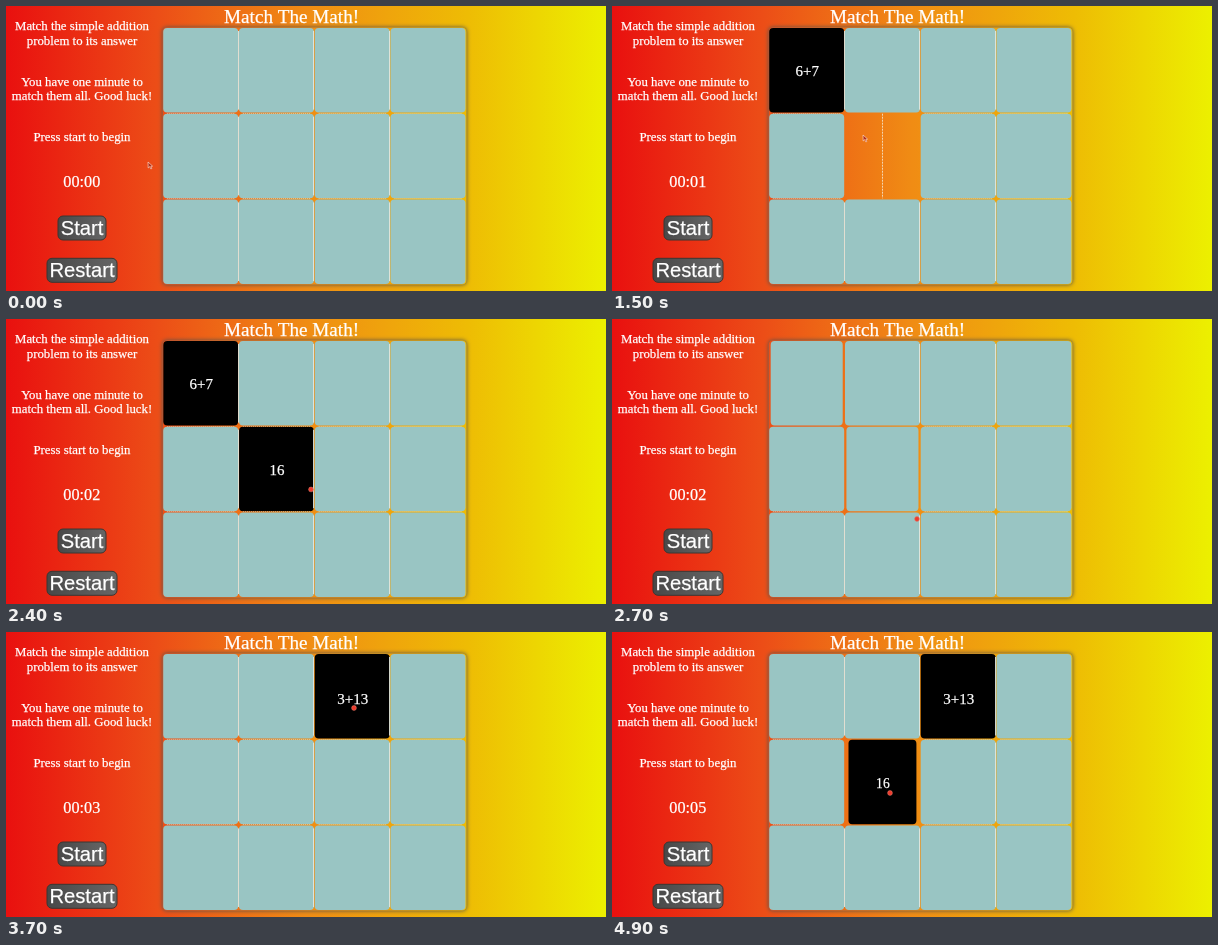
Recreate the animation shown at these times as an HTML page with a canvas. Size 600 by 285 pixels, loop 5000 ms.

```html
<!DOCTYPE html>
<html lang="en">
<head>
<meta charset="utf-8">
<title>Match The Math!</title>
<style>
html, body { margin: 0; width: 100%; height: 100%; overflow: hidden; }
canvas { display: block; width: 600px; height: 285px; }
</style>
</head>
<body>
<canvas id="stage" width="600" height="285"></canvas>
<script>
const ctx = document.getElementById('stage').getContext('2d');
const LOOP = 5000, STEP = 100, FLIP = 500;
const SERIF = '"Liberation Serif", Times, serif';
const SANS = '"Liberation Sans", Arial, sans-serif';
const CARD = { x: 157.2, y: 22, w: 75, h: 84.6, dx: 75.75, dy: 85.7 };
const BOARD = [156.5, 21.3, 304.2, 257.5, 4.5];

// Flip times alternate between opening and closing a card.
const faces = {
  0: { label: '6+7', base: 70, flips: [460, 2380] },
  2: { label: '3+13', base: 72, flips: [3150] },
  5: { label: '16', base: 156, flips: [1353, 2380, 4617] }
};

const path = [
  [0, 144, 159], [400, 197, 87], [800, 197, 87], [1300, 253, 132],
  [1500, 253, 132], [2000, 305, 165], [2300, 305, 165], [2700, 305, 200],
  [3100, 348, 76], [3900, 348, 76], [4550, 278, 161], [5000, 278, 161]
];

// The CSS "ease" curve
function ease(p) {
  if (p <= 0) return 0;
  if (p >= 1) return 1;
  let lo = 0, hi = 1;
  for (let i = 0; i < 24; i++) {
    const u = (lo + hi) / 2;
    if (0.75 * u * (1 - u) + u ** 3 < p) lo = u; else hi = u;
  }
  const v = 1 - lo;
  return 0.3 * lo * v * v + 3 * lo * lo * v + lo ** 3;
}

// Horizontal scale of a card: positive shows the back, negative the face
function spin(i, t) {
  const face = faces[i];
  if (!face) return 1;
  const turn = face.flips.reduce((a, start, k) => a + (k % 2 ? -1 : 1) * ease((t - start) / FLIP), 0);
  return Math.cos(Math.PI * turn);
}

const settled = (i, t) => Math.abs(spin(i, t)) > 0.99;

function pointerAt(t) {
  const i = Math.max(1, path.findIndex(p => p[0] > t));
  const [t0, x0, y0] = path[i - 1], [t1, x1, y1] = path[i];
  const p = (t - t0) / (t1 - t0), s = p * p * (3 - 2 * p);
  return [x0 + (x1 - x0) * s, y0 + (y1 - y0) * s];
}

function text(str, x, y, size, family = SERIF) {
  ctx.font = `${size}px ${family}`;
  ctx.textAlign = 'center';
  ctx.fillStyle = ctx.strokeStyle = '#fff';
  ctx.lineWidth = 0.25;
  ctx.fillText(str, x, y);
  ctx.strokeText(str, x, y);
}

function box(x, y, w, h, r) {
  ctx.beginPath();
  ctx.roundRect(x, y, w, h, r);
}

function line(x0, y0, x1, y1, color, dash = []) {
  ctx.setLineDash(dash);
  ctx.strokeStyle = color;
  ctx.lineWidth = 1;
  ctx.beginPath();
  ctx.moveTo(x0, y0);
  ctx.lineTo(x1, y1);
  ctx.stroke();
  ctx.setLineDash([]);
}

function background() {
  const g = ctx.createLinearGradient(0, 0, 600, 0);
  g.addColorStop(0, '#e9100f');
  g.addColorStop(0.25, '#ec4d17');
  g.addColorStop(0.5, '#f08c14');
  g.addColorStop(0.77, '#eebc04');
  g.addColorStop(1, '#ecf000');
  ctx.fillStyle = g;
  ctx.fillRect(0, 0, 600, 285);
}

function button(label, x, y, w, base) {
  const g = ctx.createLinearGradient(x, y, x + w, y);
  g.addColorStop(0, '#484848');
  g.addColorStop(1, '#666');
  box(x + 0.5, y + 0.5, w - 1, 24, 5);
  ctx.fillStyle = g;
  ctx.fill();
  ctx.strokeStyle = '#3a3632';
  ctx.lineWidth = 1;
  ctx.stroke();
  text(label, x + w / 2, base, 20.2, SANS);
}

function sidebar(t) {
  text('Match the simple addition', 76, 24.4, 12.8);
  text('problem to its answer', 76, 39, 12.8);
  text('You have one minute to', 76, 79.5, 12.8);
  text('match them all. Good luck!', 76, 94, 12.8);
  text('Press start to begin', 76, 134.6, 12.8);
  text('00:0' + Math.floor((t + 200) / 1000), 75.8, 180.8, 16.2);
  button('Start', 51.5, 209.5, 49, 229);
  button('Restart', 40.5, 251.8, 71, 271.3);
}

// Shadow outside the board only, as the board itself is clear.
function boardShadow() {
  ctx.save();
  ctx.beginPath();
  ctx.rect(0, 0, 600, 285);
  ctx.roundRect(...BOARD);
  ctx.clip('evenodd');
  ctx.shadowColor = '#55504a';
  ctx.shadowBlur = 4;
  ctx.fillStyle = '#666';
  box(...BOARD);
  ctx.fill();
  ctx.restore();
}

function card(i, t) {
  const { w, h } = CARD;
  const x = CARD.x + (i % 4) * CARD.dx, y = CARD.y + Math.floor(i / 4) * CARD.dy;
  const cx = x + w / 2, c = spin(i, t), s = Math.abs(c);
  if (s < 0.025) {
    line(Math.floor(cx) + 0.5, y, Math.floor(cx) + 0.5, y + h, 'rgba(245,235,215,0.8)', [2, 1]);
    return;
  }
  ctx.save();
  ctx.translate(cx, 0);
  ctx.scale(s, 1);
  box(-w / 2, y, w, h, 4);
  ctx.fillStyle = c > 0 ? '#99c5c3' : '#000';
  ctx.fill();
  if (c < 0) text(faces[i].label, 0.5, faces[i].base, 15);
  ctx.restore();
}

// Pale seams where two resting cards meet
function seams(t) {
  const { w, h, dx, dy } = CARD;
  for (let i = 0; i < 12; i++) {
    if (!settled(i, t)) continue;
    const x = CARD.x + (i % 4) * dx, y = CARD.y + Math.floor(i / 4) * dy;
    const sx = Math.floor(x + w) + 0.5, sy = Math.floor(y + h + 0.5) + 0.5;
    if (i % 4 < 3 && settled(i + 1, t)) line(sx, y + 3, sx, y + h - 3, 'rgba(226,232,226,0.9)');
    if (i < 8 && settled(i + 4, t)) line(x + 4, sy, x + w - 4, sy, 'rgba(240,235,215,0.5)', [1, 1]);
  }
}

// A hand marker over cards, an arrow elsewhere
function pointer(t) {
  const [x, y] = pointerAt(t);
  const col = Math.floor((x - CARD.x) / CARD.dx), row = Math.floor((y - CARD.y) / CARD.dy);
  const cx = CARD.x + col * CARD.dx + CARD.w / 2;
  const over = col >= 0 && Math.abs(x - cx) < Math.abs(spin(row * 4 + col, t)) * CARD.w / 2;
  ctx.lineWidth = 0.7;
  ctx.beginPath();
  if (over) {
    ctx.arc(x, y, 2.4, 0, Math.PI * 2);
    ctx.fillStyle = '#ee3a2c';
    ctx.strokeStyle = 'rgba(225,120,105,0.8)';
  } else {
    ctx.moveTo(x - 2, y - 3);
    ctx.lineTo(x - 1.8, y + 3);
    ctx.lineTo(x - 0.3, y + 1.6);
    ctx.lineTo(x + 0.9, y + 4);
    ctx.lineTo(x + 1.8, y + 3.5);
    ctx.lineTo(x + 0.8, y + 1.3);
    ctx.lineTo(x + 2.6, y + 1.1);
    ctx.closePath();
    ctx.fillStyle = '#b03018';
    ctx.strokeStyle = 'rgba(255,230,220,0.85)';
  }
  ctx.fill();
  ctx.stroke();
}

function draw(t) {
  background();
  boardShadow();
  for (let i = 0; i < 12; i++) card(i, t);
  seams(t);
  text('Match The Math!', 285.6, 17, 19.15);
  sidebar(t);
  pointer(t);
}

const begin = performance.now();
function tick() {
  const t = (performance.now() - begin) % LOOP;
  draw(Math.floor(t / STEP) * STEP);
  requestAnimationFrame(tick);
}
tick();
</script>
</body>
</html>
```
